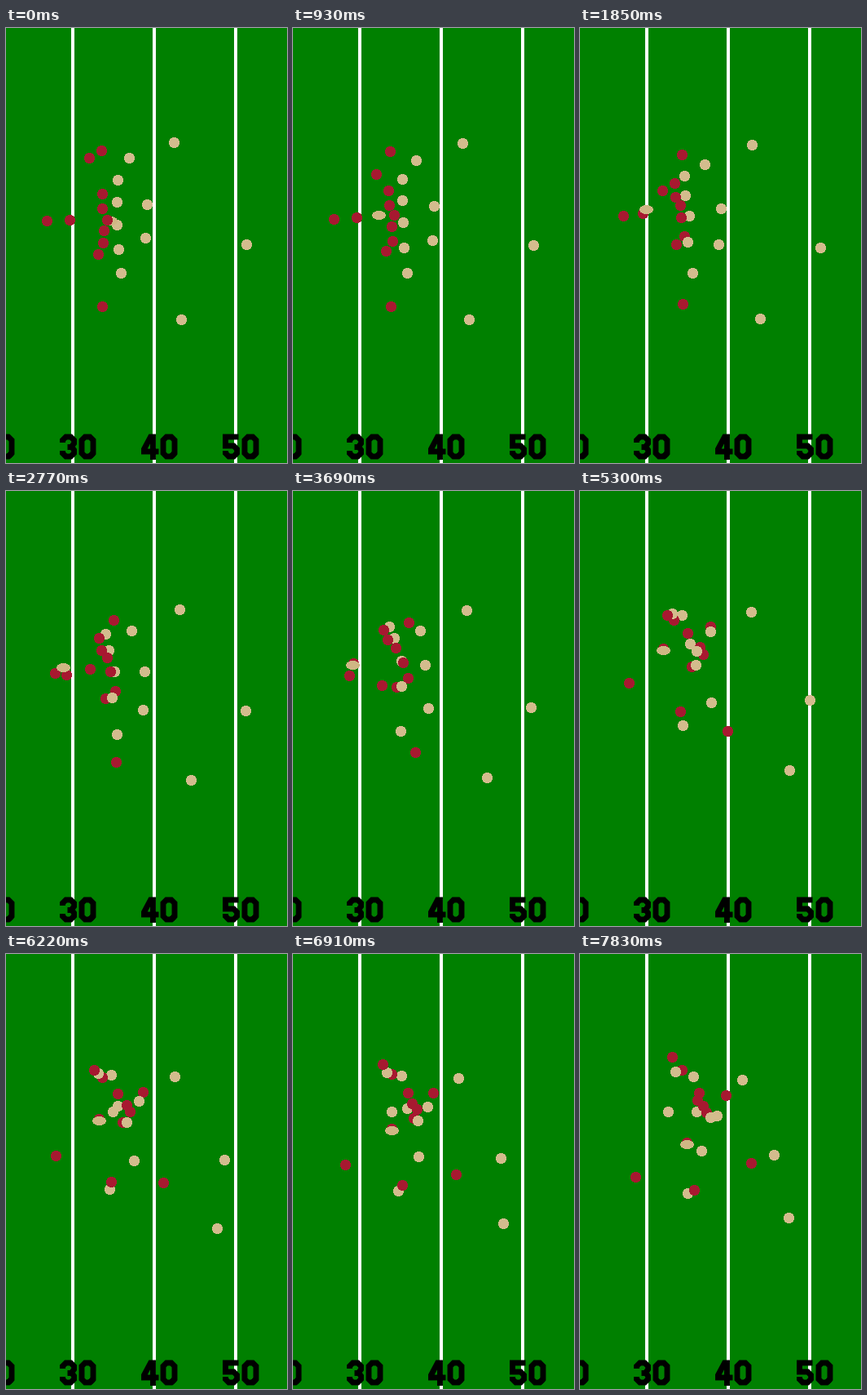
These frames come from a looping animation (345x533 px, 8 s). A matplotlib script:

```python
import numpy as np
import matplotlib.pyplot as plt
from matplotlib.animation import FuncAnimation
from matplotlib.patches import Polygon, Rectangle

W, H, DPI = 345, 533, 64
TICK, STEP, LOOP = 20, 230, 8000          # ms
GRASS, RED, TAN, LEATHER = "#008000", "#A71930", "#D3BC8D", "#CFB784"
STEPS = np.arange(LOOP // STEP + 1)
BEATS = np.array([0, 12, 23, 34])

fig = plt.figure(figsize=(W / DPI, H / DPI), dpi=DPI, facecolor=GRASS)
ax = fig.add_axes([0, 0, 1, 1])
ax.set(xlim=(0, W), ylim=(H, 0))
ax.axis("off")


def blob(rx, ry, power):
    """Outline of a superellipse: power 2 is round, lower is more pointed."""
    a = np.linspace(0, 2 * np.pi, 60, endpoint=False)
    c, s = np.cos(a), np.sin(a)
    return np.column_stack([rx * np.sign(c) * abs(c) ** (2 / power),
                            ry * np.sign(s) * abs(s) ** (2 / power)])


def glide(points, moving):
    """Cubic path through four points; starts from rest unless moving."""
    p = np.array(points, float)
    v = np.gradient(p, BEATS, axis=0)
    if not moving:
        v[0] = 0
    i = np.clip(np.searchsorted(BEATS, STEPS, side="right") - 1, 0, 2)
    h = (BEATS[i + 1] - BEATS[i])[:, None]
    u = (STEPS - BEATS[i])[:, None] / h
    return ((1 + 2 * u) * (1 - u) ** 2 * p[i] + u * (1 - u) ** 2 * h * v[i]
            + u * u * (3 - 2 * u) * p[i + 1] + u * u * (u - 1) * h * v[i + 1])


def ramp(beats, *levels):
    return np.interp(STEPS, beats, levels)[:, None]


DIAMOND, DISC, OVAL = blob(6.2, 6.2, 1.7), blob(5.95, 5.95, 2), blob(8, 5, 1.8)
movers = []


def add(shape, color, z, path):
    patch = Polygon(shape, facecolor=color, edgecolor="none",
                    antialiased=False, zorder=z)
    ax.add_patch(patch)
    movers.append((patch, shape, np.round(path) + 0.5))
    return path


def red(*points, z=4, moving=False):
    return add(DIAMOND, RED, z, glide(points, moving))


def tan(*points, z=3):
    return add(DISC, TAN, z, glide(points, False))


# Field
for x in (80, 180, 280):
    ax.add_patch(Rectangle((x, 0), 4, H, color="white", lw=0, zorder=1))

# Block numerals in a 22 x 32 box
BOWL = [(18, 24), (14, 28), (8, 28), (4, 24)]
GLYPHS = {
    "0": [BOWL + [(4, 8), (8, 4), (14, 4), (18, 8)] + BOWL[:2]],
    "3": [[(4, 11), (4, 8), (8, 4), (14, 4), (18, 8), (18, 12), (15, 16),
           (18, 20)] + BOWL + [(4, 21)], [(9, 16), (16, 16)]],
    "4": [[(15, 32), (15, 4), (12, 4), (4, 19), (4, 22), (22, 22)]],
    "5": [[(20, 4), (4, 4), (4, 15), (14, 15), (18, 19)] + BOWL + [(4, 21)]],
}


def numeral(ch, x, y=497):
    for stroke in GLYPHS[ch]:
        px, py = np.array(stroke).T
        ax.plot(px + x, py + y, color="black", lw=6.9 * 72 / DPI, zorder=2,
                solid_capstyle="butt", solid_joinstyle="miter")


numeral("0", -11)
for n, tens in enumerate("345"):
    numeral(tens, 65.5 + 100 * n)
    numeral("0", 89 + 100 * n)

# Offence: backfield, wide players, line
passer = red((78, 235), (74, 225), (60, 235), (68, 273))
runner = red((50, 236), (60, 223), (102, 193), (131, 231))
red((102, 159), (103, 218), (123, 270), (140, 289), moving=True)
red((117, 150), (132, 158), (160, 166), (179, 173))
red((118, 341), (135, 332), (181, 294), (210, 256))
red((118, 203), (114, 180), (107, 152), (113, 126), z=6)
red((118, 221), (117, 195), (115, 158), (125, 142))
snapper = red((124, 235), (124, 204), (132, 174), (146, 170), z=8)
red((120, 248), (128, 221), (147, 191), (144, 179))
red((119, 263), (134, 245), (151, 200), (151, 186))
red((113, 277), (122, 254), (137, 215), (155, 194))

# Defence: front, then coverage
tan((137, 186), (122, 175), (113, 150), (117, 144), z=5)
tan((136, 213), (126, 195), (125, 152), (139, 150))
tan((136, 241), (133, 221), (135, 187), (143, 193))
tan((138, 271), (130, 253), (142, 213), (160, 200), z=5)
tan((141, 300), (136, 298), (126, 287), (132, 293))
tan((173, 216), (170, 221), (143, 196), (108, 193), z=5)
tan((171, 257), (168, 268), (161, 259), (149, 241))
tan((151, 159), (154, 171), (160, 172), (168, 198), z=5)
tan((206, 140), (213, 145), (210, 148), (199, 154))
tan((295, 265), (294, 269), (282, 256), (238, 246))
tan((215, 357), (227, 354), (257, 342), (256, 323))

# Ball: snapped to the passer, then handed to the runner
snap = ramp((1, 7), 0, 1)
handoff = ramp((8, 12, 17), 0, 0.3, 1)
held = snapper + (passer - snapper) * snap
ball = held + (runner - held) * handoff
ball[:, :1] += ramp((8, 12), 4, 0)
ball[:, 1:] += ramp((1, 7, 12, 17), 1, -5, -8, 2)
add(OVAL, LEATHER, 7, ball)


def update(i):
    k = i * TICK // STEP
    for patch, shape, path in movers:
        patch.set_xy(shape + path[k])
    return [m[0] for m in movers]


anim = FuncAnimation(fig, update, frames=LOOP // TICK, interval=TICK,
                     repeat=True, repeat_delay=0, blit=False)
plt.show()
```
